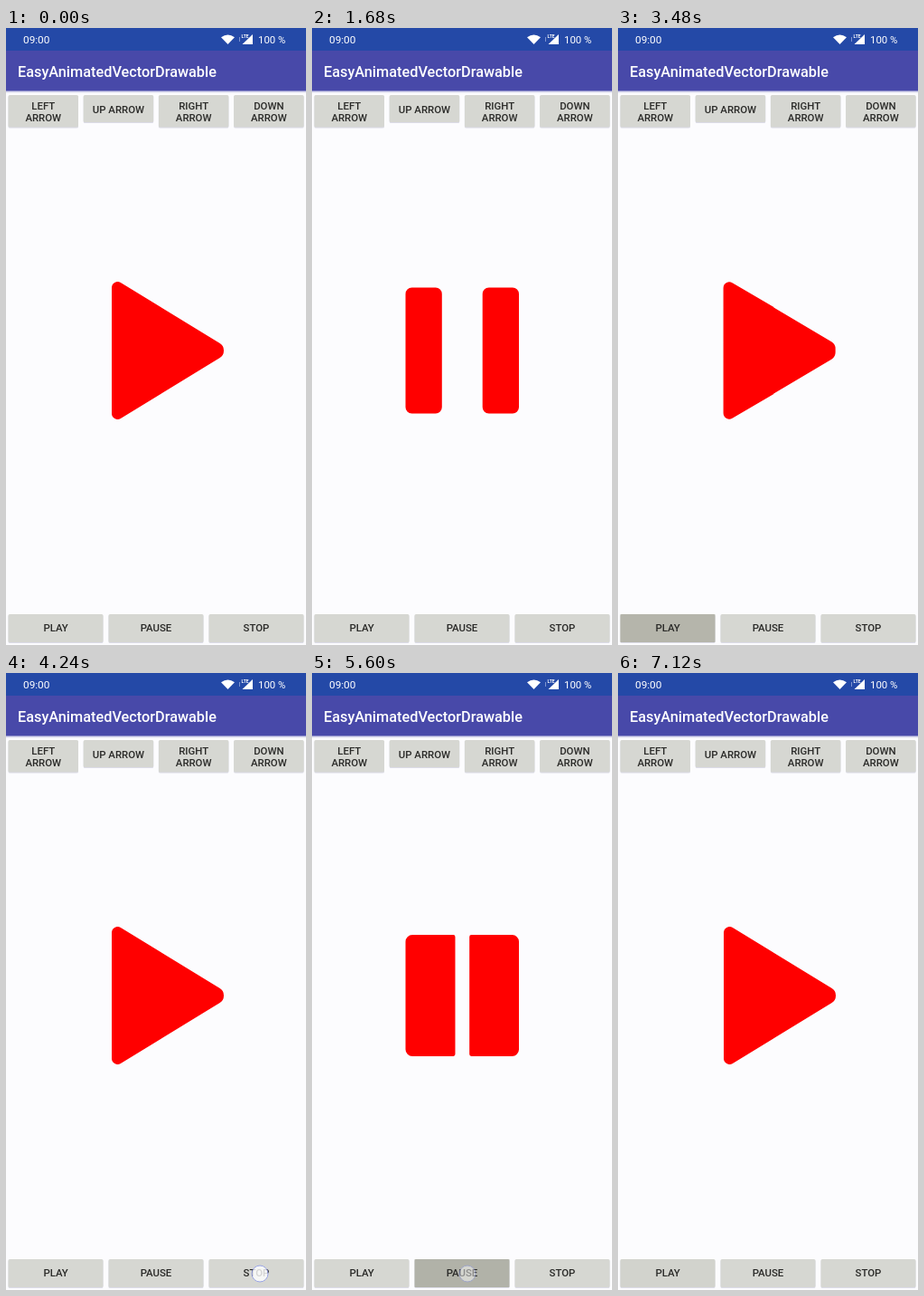
Write an HTML page that moves like this. It is 332x681 px and loops after 7.16 s.

```html
<!DOCTYPE html>
<html lang="en">
<head>
<meta charset="utf-8">
<style>
  html, body { margin: 0; width: 100%; height: 100%; overflow: hidden; background: #fcfcfe; }
  svg { display: block; }
  text { font-family: Roboto, sans-serif; }
  .label { font-size: 11.4px; font-weight: 500; text-anchor: middle; fill: #2a2a28; }
  .status { font-size: 11.8px; fill: #fff; }
</style>
</head>
<body>
<svg id="stage" width="332" height="681" viewBox="0 0 332 681">
  <defs>
    <linearGradient id="shade" x2="0" y2="1">
      <stop stop-color="#b4b4dc"/><stop offset="1" stop-color="#fcfcfe"/>
    </linearGradient>
  </defs>
  <rect width="332" height="681" fill="#fcfcfe"/>
  <rect y="69" width="332" height="3" fill="url(#shade)"/>
  <rect y="25" width="332" height="44.4" fill="#4849a9"/>
  <rect width="332" height="25" fill="#2449a7"/>
  <text class="status" x="19" y="17">09:00</text>
  <path d="M245.5 18 238 10.2Q245.5 5 253 10.2Z" fill="#fff"/>
  <path d="M273 7V18H261.5Z" fill="#fff"/>
  <text x="260.5" y="11" font-size="5" font-weight="700" fill="#fff">LTE</text>
  <path d="M258.5 10v5" stroke="#7f95cf" stroke-width="1"/>
  <text class="status" x="279" y="17" style="font-size:11.4px">100 %</text>
  <text x="13" y="53.7" font-size="16.3" font-weight="500" fill="#fff">EasyAnimatedVectorDrawable</text>
  <g id="boxes"></g>
  <svg id="ripple" y="647" width="105" height="31"><circle cy="16" fill="#42432a"/></svg>
  <g id="labels"></g>
  <path id="icon" fill="#f00"/>
  <circle id="touch" r="9" fill="#fff" stroke="#8b98ea" stroke-width="1"/>
</svg>
<script>
const $ = id => document.getElementById(id);
const LOOP = 7160, CY = 356;

function button(x, y, w, h, lines, baseline) {
  const box = (dy, fill) =>
    `<rect x="${x}" y="${y + dy}" width="${w}" height="${h}" rx="1.6" fill="${fill}"/>`;
  $('boxes').innerHTML += box(1, '#dcdce8') + box(0, '#d6d7d2');
  lines.forEach((s, i) => {
    $('labels').innerHTML +=
      `<text class="label" x="${x + w / 2}" y="${baseline + i * 13.2}">${s}</text>`;
  });
}
['LEFT', 'UP', 'RIGHT', 'DOWN'].forEach((s, i) => {
  const x = 2.5 + i * 83.2;
  if (s === 'UP') button(x, 74, 77.5, 30, ['UP ARROW'], 93.6);
  else button(x, 74, 77.5, 35.5, [s, 'ARROW'], 90);
});
const buttonX = { play: 2.5, pause: 113.5, stop: 224.5 };
for (const name in buttonX) button(buttonX[name], 647, 105, 31, [name.toUpperCase()], 666.2);

// Upper corners of the left and right halves: x, height above centre, radius.
const shapes = {
  play: [[117, 81, 6.5], [172, 47.5, 0], [160, 54.8, 0], [241, 5.4, 9]],
  pause: [[103.5, 69.5, 7], [143.8, 69.5, 7], [188.7, 69.5, 7], [229, 69.5, 7]],
  stop: [[103.5, 62.8, 8.5], [183, 62.8, -6], [150, 62.8, -6], [229, 62.8, 8.5]]
};
// start time, next shape, finger position
const taps = [
  [1080, 'pause', 170, 663], [2040, 'stop', 281, 663], [3200, 'play', 79, 664],
  [4240, 'stop', 281, 663], [5400, 'pause', 172, 663], [6560, 'play', 80, 664]
];

const clamp = v => Math.max(0, Math.min(1, v));
const ease = v => .5 - Math.cos(clamp(v) * Math.PI) / 2;

function roundPoly(pts) {
  const n = pts.length;
  return pts.map(([x, y, r], i) => {
    const toward = ([px, py]) => {
      const d = Math.hypot(px - x, py - y);
      return [(px - x) / d, (py - y) / d];
    };
    const a = toward(pts[(i + n - 1) % n]), b = toward(pts[(i + 1) % n]);
    const radius = Math.max(0, r);
    const cut = radius / Math.tan(Math.acos(a[0] * b[0] + a[1] * b[1]) / 2);
    const at = v => `${x + v[0] * cut} ${y + v[1] * cut}`;
    return `${i ? 'L' : 'M'}${at(a)}A${radius} ${radius} 0 0 1 ${at(b)}`;
  }).join('') + 'Z';
}

function half(p, q) {
  const flip = ([x, h, r], sign) => [x, CY + sign * h, r];
  return roundPoly([flip(p, -1), flip(q, -1), flip(q, 1), flip(p, 1)]);
}

function draw(t) {
  const k = taps.findLastIndex(tap => tap[0] <= t);
  const from = shapes[k > 0 ? taps[k - 1][1] : 'play'];
  const [start, name, x, y] = k < 0 ? [Infinity, 'play', 0, 0] : taps[k];
  const age = k < 0 ? -1 : t - start;

  const p = ease((age - 50) / 260);
  const c = from.map((pt, i) => pt.map((v, j) => v + (shapes[name][i][j] - v) * p));
  $('icon').setAttribute('d', half(c[0], c[1]) + half(c[2], c[3]));

  const touch = $('touch');
  touch.setAttribute('cx', x);
  touch.setAttribute('cy', y);
  touch.setAttribute('opacity', age >= 0 && age < 240 ? .8 - age / 600 : 0);

  const ripple = $('ripple'), wave = ripple.firstElementChild;
  ripple.setAttribute('x', buttonX[name]);
  wave.setAttribute('cx', x - buttonX[name]);
  wave.setAttribute('r', 110 * clamp(age / 170));
  wave.setAttribute('opacity', .25 * clamp(age / 120) * clamp((600 - age) / 350));
}

function tick() {
  draw(performance.now() % LOOP);
  requestAnimationFrame(tick);
}
tick();
</script>
</body>
</html>
```
